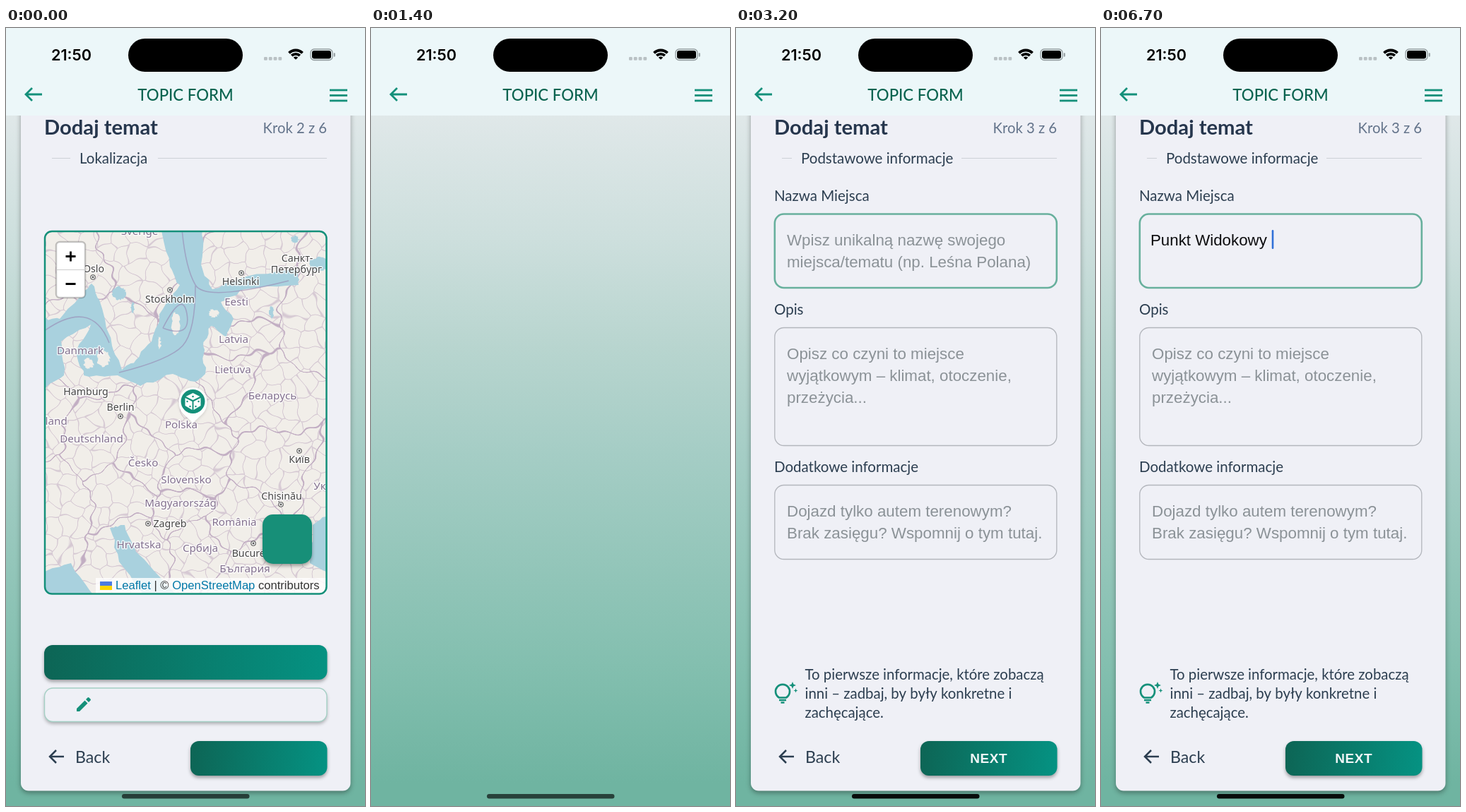
An HTML page with a canvas that plays this animation: 508 px wide and 1102 px high, repeating every 7000 ms.

```html
<!DOCTYPE html>
<html lang="pl">
<head>
<meta charset="utf-8">
<title>Topic form</title>
<style>
  html, body { margin: 0; width: 100%; height: 100%; overflow: hidden; background: #ecf7f9; }
  canvas { display: block; }
</style>
</head>
<body>
<canvas id="stage" width="508" height="1102"></canvas>
<script>
const W = 508, H = 1102, LOOP = 7000, STEP = 100;
const SANS = 'Lato, sans-serif', ARIAL = '"Liberation Sans", Arial, sans-serif', MAP = '"Noto Sans", sans-serif';
const GREEN = '#14907a', INK = '#2c3e50', CARD = '#eff0f6';
const ctx = document.getElementById('stage').getContext('2d');

function layer() {
  const c = document.createElement('canvas');
  c.width = W; c.height = H;
  return c.getContext('2d');
}
const clamp = v => Math.max(0, Math.min(1, v));

function text(g, str, x, y, font, color, align = 'left', spacing = 0) {
  g.font = font;
  g.fillStyle = color;
  g.textAlign = align;
  g.letterSpacing = spacing + 'px';
  g.fillText(str, x, y);
  g.letterSpacing = '0px';
}
function paint(g, fill, stroke, width) {
  if (fill) { g.fillStyle = fill; g.fill(); }
  if (stroke) { g.strokeStyle = stroke; g.lineWidth = width; g.stroke(); }
}
function box(g, x, y, w, h, r, fill, stroke, width) {
  g.beginPath();
  g.roundRect(x, y, w, h, r);
  paint(g, fill, stroke, width);
}
function disc(g, x, y, r, fill, stroke, width) {
  g.beginPath();
  g.arc(x, y, r, 0, Math.PI * 2);
  paint(g, fill, stroke, width);
}
function line(g, d, stroke, width) {
  g.strokeStyle = stroke;
  g.lineWidth = width;
  g.stroke(new Path2D(d));
}
function shape(g, d, fill) {
  g.fillStyle = fill;
  g.fill(new Path2D(d));
}
function shaded(g, draw, alpha = .35, blur = 5, dy = 3) {
  g.save();
  g.shadowColor = `rgba(0,0,0,${alpha})`;
  g.shadowBlur = blur;
  g.shadowOffsetY = dy;
  draw();
  g.restore();
}
function arrow(g, x, y, len, color, width) {
  line(g, `M${x + len} ${y}h${1 - len}m9 -9l-9 9l9 9`, color, width);
}

// ---- map ----
let seed = 11;
function rnd() {
  seed = (seed * 1664525 + 1013904223) % 4294967296;
  return seed / 4294967296;
}

const baltic = [50,412, 76,412, 108,377, 121,362, 132,385, 150,450, 164,484, 184,470, 206,444, 222,398, 246,364,
  232,338, 219,280, 279,280, 276,335, 292,370, 340,352, 412,343, 414,364, 338,370, 304,388, 322,412, 312,437,
  290,422, 279,450, 282,490, 268,501, 236,490, 190,507, 158,492, 110,492, 100,456, 120,420, 78,444, 82,492, 50,514];
const southSeas = [
  [147,708, 168,704, 184,742, 244,806, 196,806, 160,756],
  [50,806, 50,772, 92,758, 126,806],
  [460,688, 434,704, 430,758, 460,772]
];
const ovals = {
  lakes: [[444, 334, 16, 10], [160, 376, 10, 10], [179, 396, 2, 9], [376, 403, 3, 9], [409, 299, 6, 5]],
  islands: [[138, 468, 10, 12], [117, 475, 7, 8], [240, 419, 6, 17], [217, 446, 2, 9], [294, 404, 8, 6]]
};
const countries = [
  ['Sverige', 189, 293], ['Eesti', 326, 393], ['Latvia', 322, 446], ['Lietuva', 321, 489], ['Danmark', 105, 462],
  ['Nederland', 49, 562], ['Polska', 248, 567], ['Deutschland', 121, 587], ['Česko', 194, 621],
  ['Slovensko', 255, 645], ['Беларусь', 377, 526], ['Україна', 464, 654], ['Magyarország', 247, 678],
  ['România', 323, 705], ['Hrvatska', 188, 737], ['Србија', 275, 742], ['България', 338, 771],
  ['', 80, 320], ['', 450, 430], ['', 165, 663], ['', 70, 675], ['', 385, 625]
];
const cities = [
  ['Oslo', 124, 346, 123, 353], ['Helsinki', 332, 364, 333, 347], ['Stockholm', 232, 389, 232, 371],
  ['Hamburg', 113, 520], ['Berlin', 162, 542, 162, 550], ['Київ', 415, 616, 415, 599],
  ['Chișinău', 390, 668, 389, 675], ['Zagreb', 232, 707, 201, 702], ['București', 351, 749, 350, 730],
  ['Санкт-', 412, 331], ['Петербург', 411, 347]
];

// Fills a closed outline of flat x,y pairs, bent irregularly like a coast.
function coast(g, pts, color, amp = 4) {
  const n = pts.length;
  g.beginPath();
  for (let i = 0; i < n; i += 2) {
    const x = pts[i], y = pts[i + 1], dx = pts[(i + 2) % n] - x, dy = pts[(i + 3) % n] - y;
    for (let u = 0; u < 1; u += .2) {
      const j = u ? amp : 0;
      g.lineTo(x + dx * u + (rnd() - .5) * j, y + dy * u + (rnd() - .5) * j);
    }
  }
  paint(g, color);
}
function oval(g, [x, y, rx, ry], color) {
  const pts = [];
  for (let a = 0; a < 6.2; a += .9) pts.push(x + rx * Math.cos(a), y + ry * Math.sin(a));
  coast(g, pts, color, 3);
}

// Gap between the two nearest sites: zero on a cell border.
function gap(x, y, sites) {
  let a = 1e9, b = 1e9;
  for (const s of sites) {
    const d = Math.hypot(x - s[0], y - s[1]);
    if (d < a) { b = a; a = d; } else if (d < b) b = d;
  }
  return b - a;
}
// Country and province lines as warped cell borders.
function land(g) {
  const w = 400, h = 516, cell = 24, img = g.createImageData(w, h);
  const capitals = countries.map(c => [c[1] - 54, c[2] - 292]);
  const cols = 20, towns = [];
  for (let i = 0; i < cols * 25; i++)
    towns.push([(i % cols - 1 + rnd()) * cell, (Math.floor(i / cols) - 1 + rnd()) * cell]);
  for (let y = 0; y < h; y++) for (let x = 0; x < w; x++) {
    const wx = x + 6 * Math.sin(y / 13) + 2.5 * Math.sin(y / 4 + x / 9);
    const wy = y + 6 * Math.sin(x / 15) + 2.5 * Math.sin(x / 5 - y / 8);
    const c = Math.floor(x / cell), r = Math.floor(y / cell), near = [];
    for (let k = 0; k < 9; k++) {
      const t = towns[(r + Math.floor(k / 3)) * cols + c + k % 3];
      if (t) near.push(t);
    }
    const tx = x + 1.5 * Math.sin(y / 4), ty = y + 1.5 * Math.sin(x / 4);
    const m = Math.max(.62 * clamp(1.7 - gap(wx, wy, capitals) * .75), .36 * clamp(1.3 - gap(tx, ty, near) * .8));
    const p = (y * w + x) * 4;
    img.data[p] = 241 - 76 * m;
    img.data[p + 1] = 238 - 103 * m;
    img.data[p + 2] = 233 - 61 * m;
    img.data[p + 3] = 255;
  }
  const c = layer();
  c.putImageData(img, 54, 287);
  g.drawImage(c.canvas, 0, 0);
}
function mapLabel(g, str, x, y, font, color) {
  g.font = font;
  g.textAlign = 'center';
  g.lineWidth = 3;
  g.strokeStyle = 'rgba(255,255,255,.75)';
  g.strokeText(str, x, y);
  text(g, str, x, y, font, color, 'center');
}
function makeMap() {
  const g = layer(), water = '#a9d1de';
  g.lineJoin = 'round';
  box(g, 55, 288, 398, 513, 9);
  g.clip();
  land(g);
  for (const s of [baltic, ...southSeas]) coast(g, s, water);
  for (const o of ovals.lakes) oval(g, o, water);
  for (const o of ovals.islands) oval(g, o, '#f1eee9');
  line(g, 'M249 285Q254 340 268 364T400 358M268 365Q268 430 250 450T160 488M222 425Q250 370 256 405T222 425M50 432Q120 380 146 446',
    'rgba(150,130,175,.55)', 1.6);
  for (const [s, x, y] of countries) mapLabel(g, s, x, y, '15.2px ' + MAP, '#83718f');
  for (const [s, x, y, dx, dy] of cities) {
    mapLabel(g, s, x, y, '14.2px ' + MAP, '#454545');
    if (dx) { disc(g, dx, dy, 3.2, '#fff', '#555', 1.1); disc(g, dx, dy, 1.4, '#555'); }
  }
  return g.canvas;
}
const mapImage = makeMap();

function marker(g) {
  g.save();
  g.translate(264.5, 529);
  shaded(g, () => shape(g, 'M-20 0A20 20 0 1 1 20 0C20 17 9 20 0 31C-9 20 -20 17 -20 0Z', '#fff'), .15, 4, 1);
  disc(g, 0, 0, 17, GREEN);
  shape(g, 'M0 -12l10 5l-10 5l-10 -5Z', '#fff');
  for (const side of [-1, 1]) {
    shape(g, `M${side * 11} -5L${side} 0v12l${side * 10} -6Z`, '#fff');
    disc(g, side * 8, 0, 1.2, GREEN);
    disc(g, side * 4, 7, 1.2, GREEN);
  }
  disc(g, 0, -7, 1.3, GREEN);
  g.restore();
}
function drawMap(g, locateIcon) {
  g.drawImage(mapImage, 0, 0);
  marker(g);
  box(g, 71, 303, 41, 79, 5, '#fff', 'rgba(0,0,0,.22)', 2.5);
  line(g, 'M72 342.5h39', '#ccc', 1.2);
  line(g, 'M84.5 323.5h14m-7 -7v14M84.5 362.5h14', '#000', 2.8);
  box(g, 127, 779, 326, 22, 0, 'rgba(255,255,255,.8)');
  box(g, 133, 784, 17, 6, 0, '#4c7be1');
  box(g, 133, 790, 17, 6, 0, '#ffd500');
  let x = 155;
  for (const [s, c] of [['Leaflet', '#0078a8'], [' | © ', '#333'], ['OpenStreetMap', '#0078a8'], [' contributors', '#333']]) {
    text(g, s, x, 795, '16.6px ' + ARIAL, c);
    x += g.measureText(s).width;
  }
  box(g, 55, 288, 398.5, 513.5, 10, null, GREEN, 2.5);
  shaded(g, () => box(g, 363, 689, 70, 70, 15, '#178f78'));
  if (locateIcon) {
    const dark = '#0f6b5a';
    disc(g, 398, 724, 11.5, null, dark, 2.5);
    disc(g, 398, 724, 6.5, dark);
    line(g, 'M398 706v7m0 22v7M380 724h7m22 0h7', dark, 2.5);
  }
}

// ---- form pieces ----
function greenButton(g, x, y, w, h, label) {
  const fill = g.createLinearGradient(x, y, x + w, y + h * .3);
  fill.addColorStop(0, '#0d6555');
  fill.addColorStop(1, '#059282');
  shaded(g, () => box(g, x, y, w, h, 12, fill));
  if (label) text(g, label, x + w / 2, y + 31, 'bold 19px ' + ARIAL, '#f1f6f7', 'center', .54);
}
function cardBase(g, step, section, x, lineEnd, nextLabel) {
  shaded(g, () => box(g, 21, 60, 466.5, 1020.5, 11, CARD), .35, 7);
  text(g, 'Dodaj temat', 54, 151, 'bold 29.2px ' + SANS, '#26364d');
  text(g, `Krok ${step} z 6`, 454, 148.5, '20.3px ' + SANS, '#64748b', 'right');
  text(g, section, x, 191.5, '20.5px ' + SANS, INK);
  line(g, `M65 184.5H${x - 13}M${lineEnd} 184.5H454`, '#cdd0d6', 1.2);
  arrow(g, 61, 1032, 21, INK, 2.5);
  text(g, 'Back', 98, 1040.5, '23.2px ' + SANS, INK);
  greenButton(g, 261, 1010, 193.5, 49, nextLabel);
}

function locationCard(g, t) {
  const chosen = t >= 400;
  cardBase(g, t >= 1100 ? 3 : 2, 'Lokalizacja', 104, 215, t >= 100 ? 'NEXT' : '');
  g.save();
  if (chosen) g.translate(0, 42);
  drawMap(g, t >= 100);
  g.restore();
  shaded(g, () => box(g, 54.5, 935, 399.5, 47.5, 12, CARD), .3);
  box(g, 54.5, 935, 399.5, 47.5, 12, null, '#a5d0c5', 1.4);
  if (!chosen) {
    greenButton(g, 54, 874, 400.5, 49);
    shape(g, 'M100 964v4h4l11.500 -11.500l-4 -4ZM113 951l4 4l2.500 -2.500q1 -1 0 -2l-2 -2q-1 -1 -2 0Z', GREEN);
    return;
  }
  const info = '20.3px ' + SANS, gray = '#435365';
  text(g, 'Wybrana Lokalizacja:', 54, 230, '23.6px ' + SANS, '#20272e');
  line(g, 'M70 248v3m0 9v4m0 8v4m-8 0h16M58 251.500h22l5 4l-5 4h-22ZM82 264h-22l-5 4l5 4h22Z', '#1f2933', 2.2);
  text(g, 'Bursztonka Duża 47', 97, 269.5, info, gray);
  box(g, 54, 292, 36, 12, 0, '#f5f5f5');
  box(g, 54, 303.5, 36, 11.5, 0, '#d9143c');
  text(g, '58-037 Bursztonka Duża, Polska', 101, 310.5, info, gray);
  shape(g, 'M206.5 969q-8 -9 -8 -13.500a8 8 0 0 1 16 0q0 4.500 -8 13.500Z', INK);
  line(g, 'M203.5 958.5l6 -6', CARD, 2.6);
  text(g, 'EDYTUJ', 230, 965, 'bold 19px ' + ARIAL, INK, 'left', .54);
}

const PHRASE = 'Punkt Widokowy ';
const keyTimes = [4600, 4900, 5100, 5200, 5400, 5700, 5900, 6000, 6100, 6100, 6300, 6400, 6600, 6600, 6700];

function field(g, label, y, h, lines, focused) {
  text(g, label, 54, y - 19, '20.5px ' + SANS, INK);
  box(g, 54.8, y, 399, h, 13, null, focused ? '#68b09d' : '#b3b6bc', focused ? 2.6 : 1.3);
  lines.forEach((s, i) => text(g, s, 72, y + 44.5 + i * 31.2, '22.35px ' + ARIAL, '#8b9297'));
}
function star(g, x, y, r) {
  g.beginPath();
  for (let i = 0; i < 8; i++) {
    const a = i * Math.PI / 4, d = i % 2 ? r * .4 : r;
    g.lineTo(x + d * Math.cos(a), y + d * Math.sin(a));
  }
  paint(g, GREEN);
}
function detailsCard(g, t) {
  const focused = t >= 2500;
  const typed = PHRASE.slice(0, keyTimes.filter(k => t >= k).length);
  cardBase(g, 3, 'Podstawowe informacje', 92, 319, 'NEXT');
  field(g, 'Nazwa Miejsca', 263.5, 104.5,
    typed ? [] : ['Wpisz unikalną nazwę swojego', 'miejsca/tematu (np. Leśna Polana)'], focused);
  field(g, 'Opis', 424.5, 167, ['Opisz co czyni to miejsce', 'wyjątkowym – klimat, otoczenie,', 'przeżycia...']);
  field(g, 'Dodatkowe informacje', 647.5, 105, ['Dojazd tylko autem terenowym?', 'Brak zasięgu? Wspomnij o tym tutaj.']);

  if (focused) {
    text(g, typed, 70, 308, '22.3px ' + ARIAL, '#0c0c0e');
    const blink = clamp(.5 + .9 * Math.sin(2 * Math.PI * ((t - 2500) / 1000 + .02)));
    g.globalAlpha = typed ? 1 : blink;
    box(g, 70.7 + g.measureText(typed).width, 286, 2.6, 27, 1.3, '#2f70d8');
    g.globalAlpha = 1;
  }

  line(g, 'M61 948.5a10 10 0 1 1 10 0Z', GREEN, 2.7);
  line(g, 'M61 952h10m-7.500 3.500h5', GREEN, 2.3);
  star(g, 80, 931, 5);
  star(g, 84.5, 938.5, 3);
  ['To pierwsze informacje, które zobaczą', 'inni – zadbaj, by były konkretne i', 'zachęcające.']
    .forEach((s, i) => text(g, s, 97.5, 922.5 + i * 27, '20.4px ' + SANS, INK));
}

// ---- frame around the card ----
function backdrop(g) {
  const fill = g.createLinearGradient(0, 0, 0, H);
  [[.11, '#e0e8e9'], [.27, '#cddfdd'], [.41, '#b8d5cf'], [.545, '#a5cdc5'], [.82, '#83bfaf'], [.97, '#6fb4a1']]
    .forEach(([at, c]) => fill.addColorStop(at, c));
  box(g, 0, 0, W, H, 0, fill);
}
function header(g) {
  box(g, 0, 0, W, 124, 0, '#ecf7f9');
  text(g, '21:50', 92.5, 46, '600 21.7px Inter, sans-serif', '#000', 'center');
  box(g, 173, 15, 162, 47, 23.5, '#000');
  for (let i = 0; i < 4; i++) box(g, 365 + i * 6.8, 41, 4.8, 4.8, 1.3, '#b9c1c4');
  for (const r of [13.5, 8.2, 2.6]) {
    g.beginPath();
    g.arc(410, 45, r, -Math.PI * .75, -Math.PI * .25);
    paint(g, null, '#000', 3.8);
  }
  box(g, 431, 30, 31, 15.5, 5, null, '#8f989b', 1.3);
  box(g, 433, 32, 27, 11.5, 3.2, '#000');
  box(g, 463.8, 35.2, 1.9, 5.5, 1, '#8f989b');
  arrow(g, 27, 94, 24, GREEN, 2.8);
  for (let i = 0; i < 3; i++) line(g, `M458 ${88 + i * 7.5}h25`, GREEN, 2.8);
  text(g, 'TOPIC FORM', 254, 103, '500 22.2px ' + SANS, '#0b6450', 'center');
}

const cardLayer = layer();
function render(t) {
  backdrop(ctx);
  const leaving = t < 1400;
  let dx, alpha;
  if (leaving) {
    const u = clamp((t - 1070) / 320), p = u * u * (3 - 2 * u);
    dx = 50 * p;
    alpha = 1 - p;
  } else {
    const q = Math.pow(1 - clamp((t - 1400) / 300), 2.5);
    dx = -50 * q;
    alpha = 1 - q;
  }
  if (alpha > 0) {
    cardLayer.clearRect(0, 0, W, H);
    (leaving ? locationCard : detailsCard)(cardLayer, t);
    ctx.globalAlpha = alpha;
    ctx.drawImage(cardLayer.canvas, Math.round(dx), 0);
    ctx.globalAlpha = 1;
  }
  header(ctx);
  box(ctx, 164, 1085, 180.5, 6.5, 3.2, `rgba(0,0,0,${.64 + .29 * clamp((t - 2500) / 600)})`);
}

let start = null, shown = -1;
function tick(now) {
  if (start === null) start = now;
  const t = Math.floor(((now - start) % LOOP) / STEP) * STEP;
  if (t !== shown) { render(t); shown = t; }
  requestAnimationFrame(tick);
}
requestAnimationFrame(tick);
</script>
</body>
</html>
```
